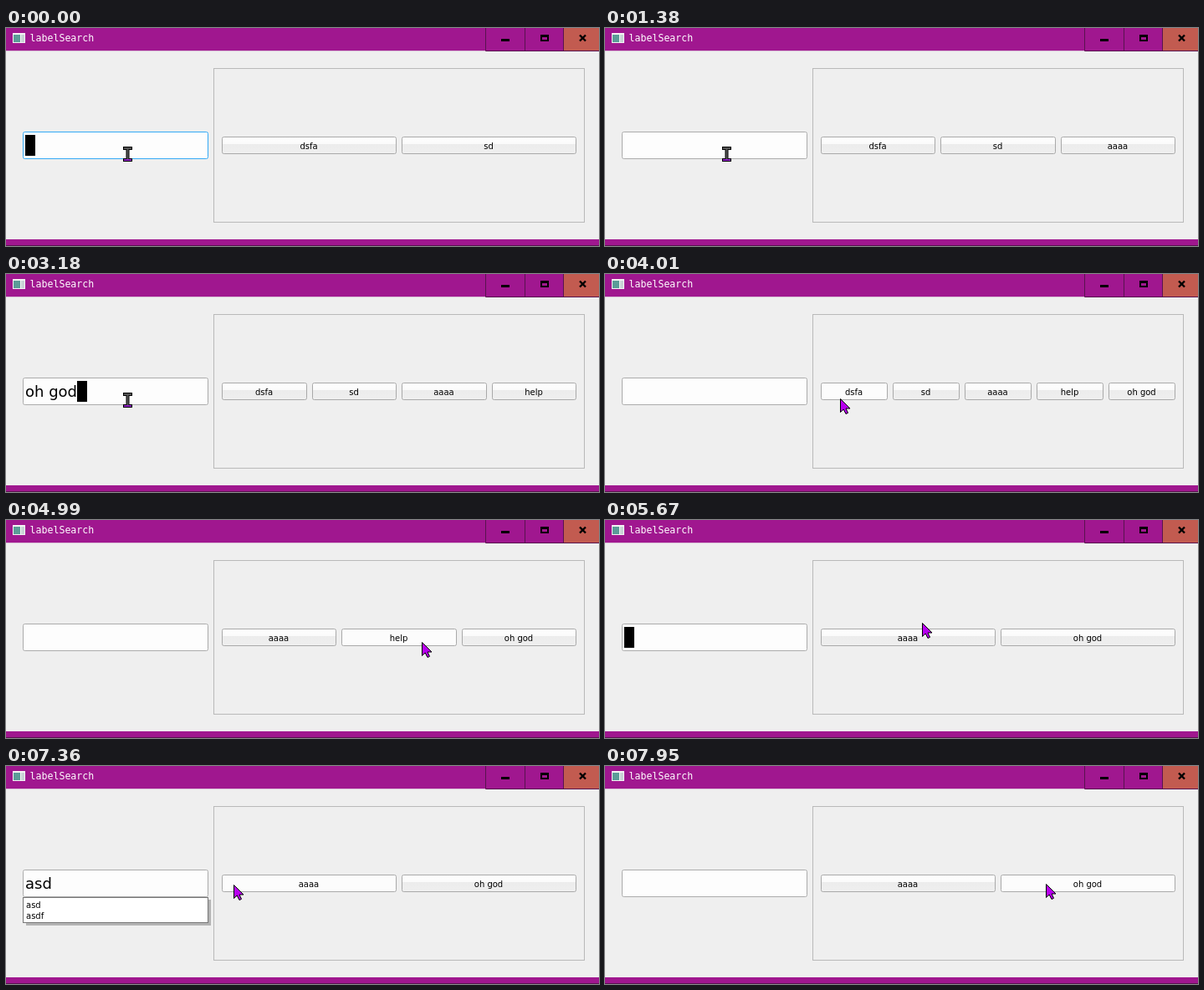
Recreate the animation shown at these times as an HTML page. Size 709 px wide and 261 px high, loop 8000 ms.

```html
<!DOCTYPE html>
<html lang="en">
<head>
<meta charset="utf-8">
<title>labelSearch</title>
<style>
  html, body { margin: 0; width: 100%; height: 100%; overflow: hidden; background: #efefef; }
  svg { display: block; width: 709px; height: 261px; }
  text { font: 10px "DejaVu Sans", sans-serif; white-space: pre; }
  .title { font: 11.6px "DejaVu Sans Mono", monospace; fill: #fff; }
  #typed { font-size: 18px; }
  #buttons text { text-anchor: middle; }
</style>
</head>
<body>
<svg viewBox="0 0 709 261">
  <defs>
    <linearGradient id="face" x2="0" y2="1">
      <stop offset="0" stop-color="#fff"/>
      <stop offset=".43" stop-color="#fafafa"/>
      <stop offset=".43" stop-color="#ececec"/>
      <stop offset="1" stop-color="#efefef"/>
    </linearGradient>
  </defs>

  <!-- window frame -->
  <rect width="709" height="261" fill="#efefef"/>
  <rect width="709" height="27" fill="#a0178f"/>
  <rect y="27" width="709" height="1" fill="#d9bfd6"/>
  <rect x="667" width="42" height="27" fill="#c25b50"/>
  <path d="M573.5 0V27.5H709M620.5 0V27M666.5 0V27" fill="none" stroke="#58134f"/>
  <path d="M592 13h10v3h-10zM639 8h10v8h-10zm2 3v3h6v-3z" fill-rule="evenodd"/>
  <path d="M686 8.5l7 7m0-7l-7 7" stroke="#000" stroke-width="2.4"/>
  <rect x="8" y="6" width="15" height="12" fill="#f4f4f4"/>
  <rect x="9" y="8" width="8" height="9" fill="#5b9c98"/>
  <rect x="18" y="8" width="4" height="9" fill="#c9d3d6"/>
  <text class="title" x="28.5" y="16">labelSearch</text>
  <rect y="253" width="709" height="7" fill="#a0178f"/>
  <rect y="260" width="709" height="1" fill="#58134f"/>
  <rect x="248.5" y="48.5" width="443" height="184" fill="none" stroke="#b9b9b9"/>

  <!-- search field -->
  <rect id="field" x="20.5" y="124.5" width="221" height="32" rx="2" fill="#fdfdfd"/>
  <text id="typed" x="23" y="147"></text>
  <rect id="caret" y="128" width="12" height="25"/>

  <g id="buttons"></g>
  <g id="popup"></g>
  <g id="beam">
    <path d="M-5.5-9h11v4h-3.5v10h3.5v4h-11v-4h3.5v-10h-3.5z"/>
    <path id="stem" d="M-4.5-8h9v2h-3.5v12h-2v-12h-3.5z"/>
    <path d="M-4.5 6h9v2h-9z" fill="#8a1fc0"/>
  </g>
  <path id="arrow" d="M.5.5V16.5L4.2 13 7 18.5 9.5 17.3 7 12H12z" fill="#b800f0" stroke="#000"/>
</svg>

<script>
const LOOP = 8000, BLINK = 530;
const $ = id => document.getElementById(id);

// [time, field text]; each entry also restarts the caret blink
const typing = [
  [0, ''], [120, 'a'], [240, 'aa'], [450, 'aaa'], [600, 'aaaa'], [760, ''], [850, ''],
  [1530, 'h'], [1620, 'he'], [1710, 'hel'], [1800, 'help'], [2330, ''],
  [2790, 'o'], [2870, 'oh'], [2950, 'oh '], [3020, 'oh g'], [3100, 'oh go'], [3180, 'oh god'], [3290, ''],
  [6300, ''], [6730, 'asd'], [7380, '']
];
const labels = [
  [0, 'dsfa,sd'], [760, 'dsfa,sd,aaaa'], [2330, 'dsfa,sd,aaaa,help'],
  [3290, 'dsfa,sd,aaaa,help,oh god'], [4200, 'sd,aaaa,help,oh god'],
  [4560, 'aaaa,help,oh god'], [5400, 'aaaa,oh god'],
  [7380, 'aaaa,oh god,asd'], [7890, 'aaaa,oh god']
];
const popups = [[0, ''], [180, 'aaa'], [600, ''], [6970, 'asd,asdf'], [7380, '']];
// [time, x, y]
const mouse = [
  [0, 145, 151], [3660, 145, 151], [3820, 190, 154], [4010, 281, 149], [4150, 288, 147],
  [4640, 290, 147], [4990, 497, 146], [5160, 497, 146], [5330, 458, 143], [5420, 456, 143],
  [5700, 370, 121], [5950, 247, 130], [6000, 247, 130], [6200, 205, 139], [6390, 176, 134],
  [7130, 176, 134], [7320, 246, 142], [7730, 515, 143], [7820, 560, 143], [7890, 562, 142],
  [7950, 527, 141], [LOOP, 527, 141]
];

const latest = (list, t) => list.findLast(e => e[0] <= t);
const split = s => s ? s.split(',') : [];

function mouseAt(t) {
  const i = Math.min(mouse.findLastIndex(k => k[0] <= t), mouse.length - 2);
  const [t0, x0, y0] = mouse[i], [t1, x1, y1] = mouse[i + 1];
  const p = (t - t0) / (t1 - t0);
  return [Math.round(x0 + (x1 - x0) * p), Math.round(y0 + (y1 - y0) * p)];
}

function buttonRow(names, mx, my) {
  const w = (424 - 6 * (names.length - 1)) / names.length;
  return names.map((name, i) => {
    const start = 258 + i * (w + 6);
    const left = Math.round(start), right = Math.round(start + w);
    const hover = mx >= left && mx < right && my >= 130 && my < 151;
    return `<rect x="${left + .5}" y="130.5" width="${right - left - 1}" height="20" rx="2"
      fill="${hover ? '#fcfcfc' : 'url(#face)'}" stroke="#a9a9a9"/>
      <text x="${(left + right) / 2 - .5}" y="145">${name}</text>`;
  }).join('');
}

function popupList(rows) {
  if (!rows.length) return '';
  const h = 5 + 13 * rows.length;
  return `<rect x="24" y="160" width="221" height="${h}" opacity=".25"/>
    <rect x="20.5" y="157.5" width="221" height="${h - 1}" fill="#fff" stroke="#777"/>` +
    rows.map((s, i) => `<text x="24" y="${170 + 13 * i}">${s}</text>`).join('');
}

function draw(t) {
  const [x, y] = mouseAt(t);
  const inField = x >= 20 && x < 242 && y >= 124 && y < 157;
  const lit = inField && (t < 760 || t > 5500);
  const [since, text] = latest(typing, t);

  $('field').setAttribute('stroke', lit ? '#33a9f5' : '#ababab');
  $('typed').textContent = text;
  $('caret').setAttribute('x', 23 + Math.round(text ? $('typed').getComputedTextLength() : 0));
  $('caret').style.display = Math.floor((t - since) / BLINK) % 2 ? 'none' : '';
  $('buttons').innerHTML = buttonRow(split(latest(labels, t)[1]), inField ? -1 : x, y);
  $('popup').innerHTML = popupList(split(latest(popups, t)[1]));

  $('beam').style.display = inField ? '' : 'none';
  $('arrow').style.display = inField ? 'none' : '';
  $('stem').setAttribute('fill', t < 3690 ? '#555' : '#8a1fc0');
  $('beam').setAttribute('transform', `translate(${x + .5} ${y})`);
  $('arrow').setAttribute('transform', `translate(${x} ${y})`);
}

let begin;
function tick(now) {
  begin ??= now;
  draw((now - begin) % LOOP);
  requestAnimationFrame(tick);
}
draw(0);
requestAnimationFrame(tick);
</script>
</body>
</html>
```
